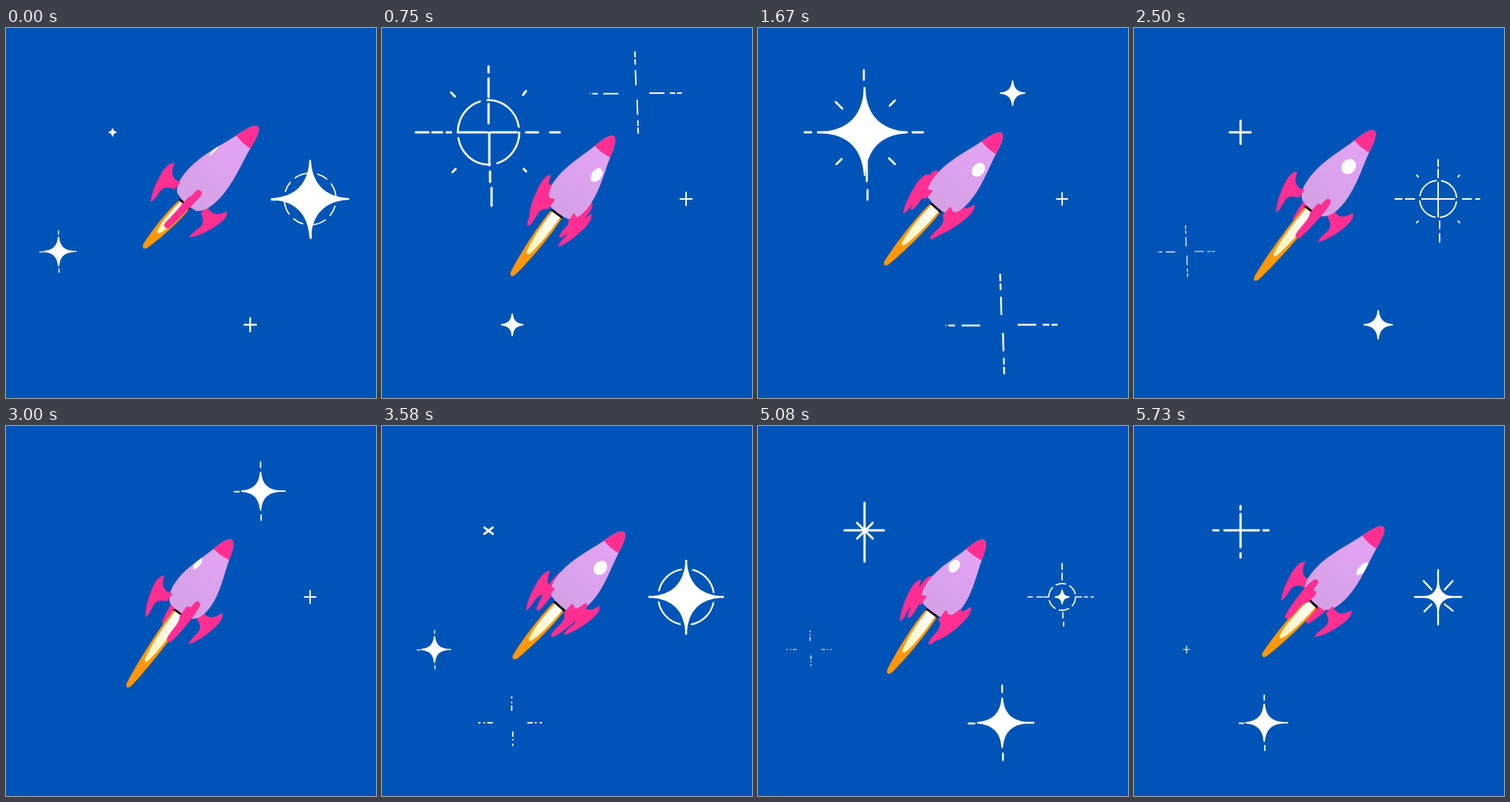
Recreate the animation shown at these times as an HTML page without scripts. Size 500x500 px, loop 5.88 s.

```html
<!DOCTYPE html>
<html lang="en">
<head>
<meta charset="utf-8">
<title>Rocket among twinkling stars</title>
<style>
/* --k counts drawings at 12 per second; everything else follows from it */
@property --k { syntax: '<number>'; inherits: true; initial-value: 0; }
@property --f { syntax: '<number>'; inherits: true; initial-value: 230; }
@property --d { syntax: '<number>'; inherits: true; initial-value: 134; }
@property --t { syntax: '<number>'; inherits: true; initial-value: 0; }
@property --p { syntax: '<angle>'; inherits: true; initial-value: 0deg; }
@property --h { syntax: '<angle>'; inherits: true; initial-value: 0deg; }

html, body { margin: 0; width: 100%; height: 100%; overflow: hidden; background: #0054b8; }
svg {
  display: block; width: 100%; height: 100%;
  animation: count 5880ms -6ms infinite, flicker 5880ms linear infinite;
}
@keyframes count {
  0% { --k: 0; animation-timing-function: steps(67); }
  94.9% { --k: 67; animation-timing-function: steps(1); }
  97.45%, 100% { --k: 69; }
}
@keyframes flicker {
  0%, 100% { --f: 225; }
  12.8% { --f: 233.6; }
  28.4% { --f: 238; }
  42.5% { --f: 259; }
  60.9% { --f: 227; }
  86.4% { --f: 222; }
  97.5% { --f: 239; }
}

/* rocket: origin at the nose, swaying while it spins */
.rocket {
  --p: calc(var(--k) * 15.306deg);
  --d: calc(134 + 12.5 * cos(var(--p) - 31deg));
  transform:
    translate(calc(323px + 18px * cos(var(--p) - 15deg)), calc(143px - 11.5px * cos(var(--p) - 31deg)))
    rotate(calc(39.3deg + 4deg * cos(var(--p))));
}
.hull { transform: scale(1, calc(var(--d) / 135)); }
.nozzle { transform: translate(0, calc(var(--d) * 1px)); }
.flame { transform: translate(0, 1px) scale(1, calc((var(--f) - var(--d)) / 100)); }
.window {
  --h: calc(var(--p) - 86deg);
  --c: cos(var(--h));
  --s: calc(sin(var(--h)) * clamp(-1, var(--c) * 999, 1));
  transform:
    translate(calc(14px * var(--s) + 7px * pow(var(--s), 7)), 58px)
    scale(pow(max(var(--c), -1 * var(--c)), .7), 1);
}
.fin {
  --h: calc(var(--p) - 86deg + var(--i) * 90deg);
  --c: cos(var(--h));
  fill: #ff2f92; stroke: #ff2f92; stroke-linejoin: round;
  stroke-width: calc(9px * pow(var(--c) * var(--c), 2));
  opacity: clamp(0, var(--side) * var(--c) * 999, 1);
  transform: translate(0, calc(8px * var(--c) + (var(--d) - 135) * 1px)) scale(sin(var(--h)), 1);
}
.back { --side: -1; }
.front { --side: 1; }
#finShape, #spark { vector-effect: non-scaling-stroke; }

/* stars: --o shifts the 14.5 step cycle; each drawing lives from --a to --b and scales from --s to --e */
.star {
  --v: (var(--k) + var(--o));
  --t: calc(var(--v) - 14.5 * (
    clamp(0, (var(--v) - 14.49) * 999, 1) + clamp(0, (var(--v) - 28.99) * 999, 1) +
    clamp(0, (var(--v) - 43.49) * 999, 1) + clamp(0, (var(--v) - 57.99) * 999, 1) +
    clamp(0, (var(--v) - 72.49) * 999, 1)));
  fill: none; stroke: #fff; stroke-width: 2.4; stroke-linecap: round;
}
.w {
  opacity: calc(clamp(0, (var(--t) - var(--a)) * 999, 1) * clamp(0, (var(--b) - var(--t)) * 999, 1));
  transform: scale(calc(var(--s) + (var(--e) - var(--s)) * clamp(0, (var(--t) - var(--a)) / (var(--b) - var(--a)), 1)));
}
.core { fill: #fff; stroke-width: 2; stroke-linejoin: round; }
</style>
</head>
<body>
<svg viewBox="0 0 500 500">
  <defs>
    <linearGradient id="glow" x2="0" y2="1">
      <stop stop-color="#fff"/><stop offset="1" stop-color="#fff3b4"/>
    </linearGradient>
    <linearGradient id="skin" x2="0" y2="1">
      <stop offset=".2" stop-color="#e2a3f3"/><stop offset="1" stop-color="#d5a0e6"/>
    </linearGradient>
    <path id="hullShape" d="M0 0C6 0 10 14 13 27C18 47 29 74 29 98C29 116 25 126 17 131Q0 135 -17 131C-25 126 -29 116 -29 98C-29 74 -18 47 -13 27C-10 14 -6 0 0 0Z"/>
    <clipPath id="hullClip"><use href="#hullShape"/></clipPath>
    <path id="spark" d="M0-100C4-38 38-4 100 0C38 4 4 38 0 100C-4 38-38 4-100 0C-38-4-4-38 0-100Z"/>

    <g id="twinkle">
      <path class="w" style="--a:-.1;--b:.6;--s:1;--e:1" d="M-8 0H8M0-9V9"/>
      <g class="w core" style="--a:.6;--b:4.2;--s:.16;--e:.42"><use href="#spark"/></g>
      <path class="w" style="--a:2;--b:4.2;--s:.85;--e:1.2" d="M0-41v-9M1 41v9M-37 1h-8M33 0h9"/>
      <g class="w" style="--a:4.2;--b:5.8;--s:.98;--e:1" stroke-linecap="butt">
        <path stroke-dasharray="25 9 9 3 10 99" d="M21 0H75M-30 1H-77M-1-13L-3-75M1 11L3 75"/>
      </g>
      <g class="w" style="--a:5.8;--b:6.55;--s:1;--e:1" stroke-linecap="butt">
        <path stroke-dasharray="10 4 3 6 4 99" d="M28 0H64M-36 0H-72M-1-22V-64M1 16V62"/>
      </g>
    </g>

    <g id="halo">
      <path class="w" style="--a:-.1;--b:6;--s:.9;--e:1" stroke-width="2" d="M-8 0H8M0-9V9"/>
      <g class="w" style="--a:6;--b:8.4;--s:.9;--e:1.1">
        <g class="core" transform="scale(.2)"><use href="#spark"/></g>
        <path d="M-32 0H32M0-37V38M-9-10L-20-22M9-10L20-22M-9 10L-19 20M9 10L20 19"/>
      </g>
      <g class="w" style="--a:8.4;--b:10.3;--s:.85;--e:1.02">
        <g class="core" transform="scale(.48)"><use href="#spark"/></g>
        <circle r="38" stroke-dasharray="44 16" stroke-dashoffset="-8"/>
        <path stroke-width="3" d="M0-48v-1M0 48v2M-50 0h2M48 0h2"/>
      </g>
      <g class="w" style="--a:10.3;--b:10.9;--s:1;--e:1">
        <g class="core" transform="scale(.52)"><use href="#spark"/></g>
        <circle r="35" stroke-width="1.8" stroke-dasharray="14 9 19 13" stroke-dashoffset="-10"/>
        <path d="M-52 1H-36M36 0H51M0-50V-36M1 36V53"/>
      </g>
      <g class="w" style="--a:10.9;--b:12.6;--s:1;--e:1" stroke-width="1.9">
        <circle r="25" stroke-dasharray="32 7.3" stroke-dashoffset="-4"/>
        <path d="M-22 0H22M0-22V24M-58 0h9M-44 0h12M33 0h12M51 0h5M0-53v9M0-40v11M2 30v10M2 47v11M-27-30l-2-2M27-30l2-2M-27 30l-2 2M27 30l2 2"/>
      </g>
      <g class="w" style="--a:12.6;--b:14.6;--s:1.05;--e:.95" stroke-width="1.7">
        <g class="core" transform="scale(.09)"><use href="#spark"/></g>
        <circle r="18" stroke-dasharray="13 6"/>
        <path d="M-46 0h6M-34 0h8M-24 0h6M18 0h8M30 0h4M39 0h3M0-45v8M0-32v9M1 21v7M2 34v5"/>
      </g>
    </g>

    <g id="burst">
      <path class="w" style="--a:-.1;--b:1.3;--s:.8;--e:1" stroke-width="3" d="M-6-4L6 5M6-4L-6 5"/>
      <g class="w core" style="--a:1.3;--b:2;--s:.04;--e:.06"><use href="#spark"/><circle r="55"/></g>
      <path class="w" style="--a:2;--b:3.4;--s:.8;--e:1.3" stroke-width="3" d="M-15 0H14M0-16V16"/>
      <path class="w" style="--a:3.4;--b:5.5;--s:.9;--e:1.1" stroke-width="3" d="M-27 0H26M0-37V42M-10-10L11 11M11-10L-10 11"/>
      <g class="w" style="--a:5.5;--b:8.5;--s:.9;--e:1.1" stroke-width="2.8">
        <g class="core" transform="scale(.58)"><use href="#spark"/></g>
        <path d="M-63 0H-40M40 0H56M0-60V-40M3 40V66M-81 0h9M65 0h14M-1-84v13M4 78v13M-30-32l-9-9M34-36l7-7M-31 36l-7 7M33 35l8 8"/>
      </g>
      <g class="w" style="--a:8.5;--b:11.5;--s:.92;--e:1.06" stroke-width="2.6">
        <ellipse rx="41" ry="43" stroke-dasharray="54 10 60 8"/>
        <path stroke-width="3" d="M-41 0H-2M3 0H38M0-38V-12M1 0V44M-97 0h17M-75 0h13M-56 0h6M50 0h16M82 0h13M0-88v8M0-72v25M2 52v14M4 74v24M-45-48l-5-5M46-50l4-5M-44 49l-4 4M47 49l3 3"/>
      </g>
      <path class="w" style="--a:11.5;--b:13.3;--s:1.03;--e:.97" stroke-width="3" d="M-22 0H25M0-22V23M-37 0h7M31 0h7M0-33v5M0 31v6"/>
    </g>

    <path id="finShape" d="M24 116Q41 124 48 103Q56 108 51 128Q46 150 36 163Q33 162 36 146Q39 134 24 129Z"/>
  </defs>

  <g transform="translate(144 141)"><g class="star" style="--o:1.5"><use href="#burst"/></g></g>
  <g transform="translate(344 88) scale(.83)"><g class="star" style="--o:10.1"><use href="#twinkle"/></g></g>
  <g transform="translate(411 231)"><g class="star" style="--o:10.5"><use href="#halo"/></g></g>
  <g transform="translate(71 302) scale(.52)"><g class="star" style="--o:3.5"><use href="#twinkle"/></g></g>
  <g transform="translate(176 401) scale(.73)"><g class="star" style="--o:6.6"><use href="#twinkle"/></g></g>
  <g transform="translate(330 401)"><g class="star" style="--o:0"><use href="#twinkle"/></g></g>

  <g class="rocket">
    <g class="back">
      <use href="#finShape" class="fin" style="--i:0"/>
      <use href="#finShape" class="fin" style="--i:1"/>
      <use href="#finShape" class="fin" style="--i:2"/>
      <use href="#finShape" class="fin" style="--i:3"/>
    </g>
    <g class="nozzle">
      <ellipse rx="10" ry="3"/>
      <g class="flame">
        <path fill="#ff970a" d="M-9 0C-11 26 -8 70 -3.5 96Q0 103 3.5 96C8 70 11 26 9 0Z"/>
        <path fill="url(#glow)" d="M-6.5 0C-7.5 24 -6 48 -2.5 62Q0 67 2.5 62C6 48 7.5 24 6.5 0Z"/>
      </g>
    </g>
    <g class="hull">
      <use href="#hullShape" fill="url(#skin)"/>
      <g clip-path="url(#hullClip)">
        <path fill="#ff2f92" d="M-20-5H20V25Q0 31 -20 25Z"/>
        <ellipse class="window" rx="9.5" ry="10.5" fill="#fff"/>
      </g>
    </g>
    <g class="front">
      <use href="#finShape" class="fin" style="--i:0"/>
      <use href="#finShape" class="fin" style="--i:1"/>
      <use href="#finShape" class="fin" style="--i:2"/>
      <use href="#finShape" class="fin" style="--i:3"/>
    </g>
  </g>
</svg>
</body>
</html>
```
